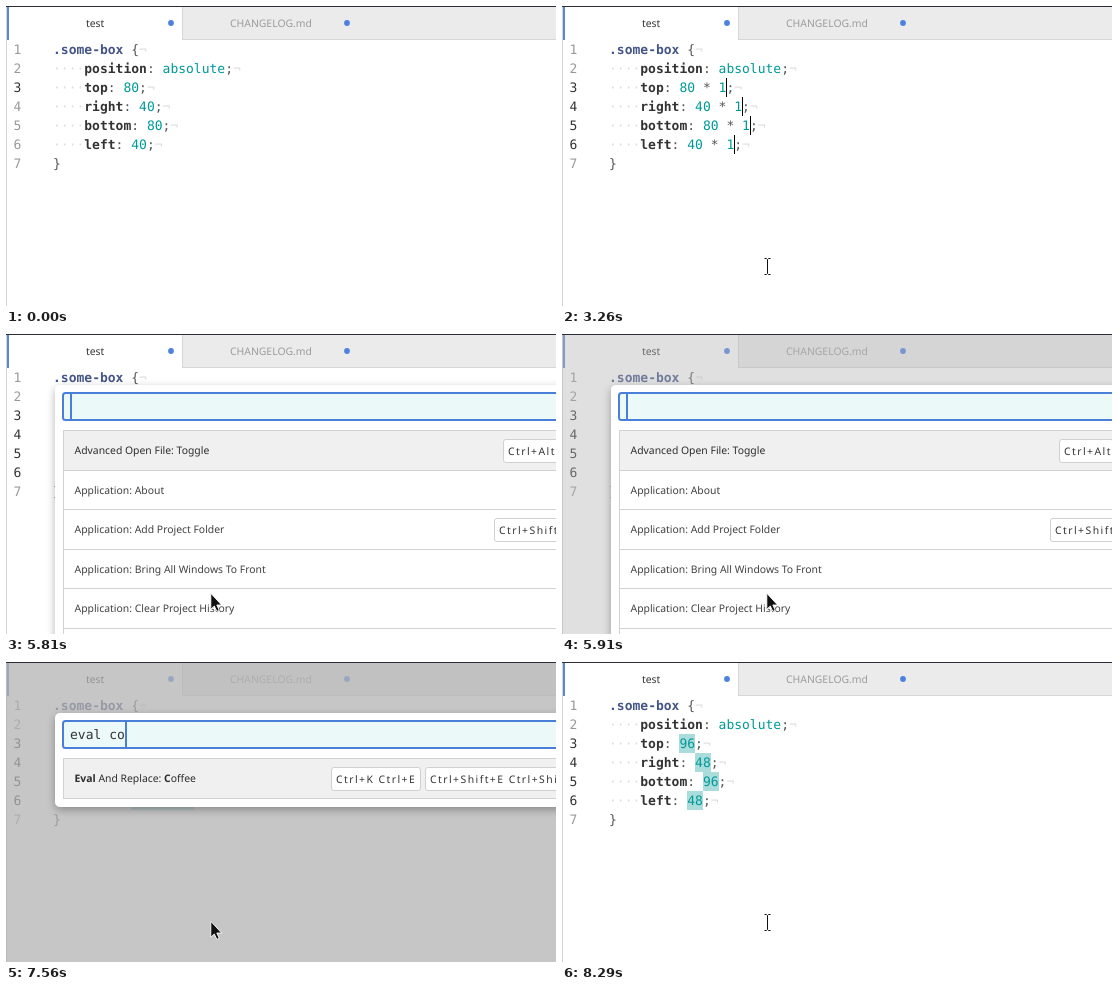
These frames come from a looping animation (550 by 300 pixels, 9750 ms). An HTML page:

```html
<!DOCTYPE html>
<html lang="en">
<head>
<meta charset="utf-8">
<title>Evaluate in editor</title>
<style>
html, body { margin: 0; width: 100%; height: 100%; overflow: hidden; background: #fff; }
svg { display: block; width: 550px; height: 300px; }
text { white-space: pre; text-rendering: geometricPrecision; }
.code { font: 13px "DejaVu Sans Mono", monospace; }
.ui { font: 10.4px "Noto Sans", "Open Sans", sans-serif; }
.key { letter-spacing: 1.45px; }
.b { font-weight: bold; }
</style>
</head>
<body>
<svg id="stage" viewBox="0 0 550 300" xmlns="http://www.w3.org/2000/svg">
  <defs>
    <filter id="shadow" x="-10%" y="-20%" width="120%" height="150%">
      <feDropShadow dx="0" dy="3" stdDeviation="4" flood-color="#000" flood-opacity=".3"/>
    </filter>
  </defs>
  <g id="editor"></g>
  <rect id="shade" y="1" width="550" height="299" fill="#b3b3b3"/>
  <g id="palette"></g>
  <g id="mouse"></g>
</svg>
<script>
const LOOP = 9750, CW = 13 * 1233 / 2048, LEFT = 47, ROW = 19, TOP = 34;
const OPEN = 5810, CLOSE = 8250, RESULT = 8290;
const INK = '#555', TEAL = '#099', FAINT = '#dcdcdc', RULE = '#d2d2d2', BLUE = '#4a7fd9';
const $ = id => document.getElementById(id);

const rect = (x, y, w, h, fill, extra = '') =>
  `<rect x="${x}" y="${y}" width="${w}" height="${h}" fill="${fill}" ${extra}/>`;
const text = (x, y, s, fill, cls) =>
  `<text x="${x}" y="${y}" fill="${fill}" class="${cls}">${s}</text>`;
// Latest value in a list of [time, value] pairs
const at = (steps, t) => steps.reduce((v, s) => t >= s[0] ? s[1] : v, steps[0][1]);

const fields = [['top', 80], ['right', 40], ['bottom', 80], ['left', 40]];
const caretFrom = [270, 1270, 1510, 1850];
const typed = [[0, ''], [2450, ' '], [2890, ' *'], [3030, ' * '],
  [3260, ' * 1'], [3610, ' * 1.'], [3940, ' * 1.2']];
// Characters selected, counted back from the semicolon
const selected = [[0, 0], [4260, 1], [4365, 2], [4470, 3], [4630, 5], [4800, 8], [RESULT, 2]];

const colX = col => LEFT + col * CW;
const mono = (col, row, s, fill, cls = '') =>
  text(colX(col), TOP + 14 + row * ROW, s, fill, 'code ' + cls);

function chrome() {
  return rect(0, 0, 550, 300, '#fff') +
    rect(176, 1, 374, 33, '#ebebeb') +
    rect(176, 33, 374, 1, '#d6d6d6') +
    rect(176, 1, 1, 33, '#d6d6d6') +
    rect(0, 1, 1, 299, '#d4d4d4') +
    rect(1, 1, 2, 33, '#5a86dc') +
    rect(0, 0, 550, 1, '#2c2c3a') +
    text(80, 21, 'test', '#333', 'ui') +
    text(224, 21, 'CHANGELOG.md', '#9c9c9c', 'ui') +
    [165, 341].map(x => `<circle cx="${x}" cy="17" r="2.9" fill="#4f80e1"/>`).join('');
}

function field(i, t) {
  const row = i + 2, [name, num] = fields[i];
  const done = t >= RESULT;
  const tail = done ? '' : at(typed, t);
  const value = done ? String(num * 1.2) : String(num);
  const col = 4 + name.length, start = col + 2;
  const end = start + value.length + tail.length;
  const sel = at(selected, t);
  let out = '';
  if (sel) out += rect(Math.round(colX(end - sel)), TOP + row * ROW,
    Math.round(sel * CW), ROW, '#a9dcdb');
  out += mono(0, row, '····', FAINT) + mono(4, row, name, '#333', 'b') +
    mono(col, row, ':', INK) + mono(start, row, value, TEAL);
  const after = start + value.length;
  if (tail.length > 1) out += mono(after + 1, row, '*', INK);
  if (tail.length > 3) out += mono(after + 3, row, tail.slice(3), TEAL);
  out += mono(end, row, ';', INK) + mono(end + 1, row, '¬', FAINT);
  const blinkOff = t >= 610 && t < 780;
  if (t >= caretFrom[i] && !sel && !blinkOff) {
    const c = t >= 2110 ? end : end + 1;
    out += rect(Math.round(colX(c)), TOP + row * ROW, 1, ROW, '#000');
  }
  return out;
}

function editor(t) {
  let out = chrome();
  for (let r = 0; r < 7; r++) {
    const i = r - 2;
    const active = i === 0 || (i > 0 && i < 4 && t >= caretFrom[i]);
    out += text(7.5, TOP + 14 + r * ROW, r + 1, active ? '#333' : '#999', 'code');
  }
  out += mono(0, 0, '.some-box', '#458', 'b') + mono(10, 0, '{', INK) + mono(11, 0, '¬', FAINT);
  out += mono(0, 1, '····', FAINT) + mono(4, 1, 'position', '#333', 'b') + mono(12, 1, ':', INK) +
    mono(14, 1, 'absolute', TEAL) + mono(22, 1, ';', INK) + mono(23, 1, '¬', FAINT);
  fields.forEach((f, i) => out += field(i, t));
  return out + mono(0, 6, '}', INK);
}

// Rows: label with *matched* parts, then [x, keys] pairs
const chord = 'Ctrl+Shift+E Ctrl+Shift+', combo = 'Ctrl+K Ctrl+E';
const evalRows = e => [
  [`*Eval* And R${e}place: Js`, [411, chord + 'J']],
  [`*Eval* And R${e}place: Shell`, [409, chord + 'S']],
  [`*Eval* And R${e}place: Coffee`, [315, combo], [409, chord + 'C']],
  [`Tree View: R*eveal* Activ${e} File`, [396, 'Ctrl+K Ctrl+T'], [490, 'Ctrl+Shift+T']],
  [`S*e*ttings *V*iew: Uninst*al*l Th${e}mes`]
];
const coffee = s => [[`*Eval* And Replace: ${s}`, [325, combo], [419, chord + 'C']]];
const all = [
  ['Advanced Open File: Toggle', [497, 'Ctrl+Alt+O']],
  ['Application: About'],
  ['Application: Add Project Folder', [488, 'Ctrl+Shift+A']],
  ['Application: Bring All Windows To Front'],
  ['Application: Clear Project History']
];
const key = n => 7260 + n * 580 / 9;
const queries = [[OPEN, ''], [6230, 'e'], [6780, 'eval'], [6980, 'eval e'], [key(0), 'eval '],
  [key(2), 'eval c'], [key(4), 'eval co'], [key(6), 'eval cof'], [key(8), 'eval coff']];
const lists = [[OPEN, all], [6820, evalRows('e')], [7050, evalRows('*e*')],
  [key(1), evalRows('e')], [key(3), coffee('*C*offee')], [key(5), coffee('*Co*ffee')],
  [key(7), coffee('*Cof*fee')], [key(9), coffee('*Coff*ee')]];

const marked = s => s.split('*').map((p, i) => i % 2 ? `<tspan class="b">${p}</tspan>` : p).join('');

function keycap(x, y, s) {
  const w = s.length === combo.length ? 89 : s.length * 7.6 + 9;
  return rect(x + .5, y + .5, w, 23, '#fff', 'rx="2.5" stroke="#d0d0d0"') +
    text(x + 5, y + 16, s, '#333', 'ui key');
}

function palette(t) {
  const rows = at(lists, t), query = at(queries, t), short = rows.length === 1;
  let out = rect(49, 51, 560, short ? 94 : 300, '#fff', 'rx="5" filter="url(#shadow)"');
  out += rect(57, 59, 540, 27, '#ebf9f9', `rx="2.5" stroke="${BLUE}" stroke-width="2"`);
  out += text(64, 77, query, '#333', 'code');
  out += rect(Math.round(64 + query.length * CW), 60, 2, 25, BLUE);
  out += rect(57, 97, 540, 39, '#f0f0f0');
  out += rect(57, 97, 1, short ? 39 : 203, RULE) + rect(57, 96, 540, 1, RULE);
  rows.forEach(([label, ...keys], i) => {
    const y = Math.floor(96.5 + i * 39.5 + .5);
    out += rect(57, Math.floor(136 + i * 39.5), 540, 1, RULE) +
      text(68.5, 120.3 + i * 39.4, marked(label), i ? '#404040' : '#2c2c2c', 'ui');
    keys.forEach(([x, s]) => out += keycap(x, y + 8, s));
  });
  return out;
}

function mouse(t) {
  if (t < 90) return '';
  if (t < 230 || (t >= OPEN && t < CLOSE))
    return '<path d="M204.8 259.3V275.2L208.3 272L210.9 277.4L213.3 276.3L210.8 271H215.6Z" ' +
      'fill="#111" stroke="#fff" stroke-width=".9"/>';
  const d = 'M202.5 252.5H204.5L205.5 253.5L206.5 252.5H208.5M205.5 253.5V267.5' +
    'M202.5 268.5H204.5L205.5 267.5L206.5 268.5H208.5';
  return `<path d="${d}" fill="none" stroke="#fff" stroke-width="2.6"/>` +
    `<path d="${d}" fill="none" stroke="#111"/>`;
}

const last = {};
function put(id, html) {
  if (last[id] !== html) $(id).innerHTML = last[id] = html;
}

function draw(t) {
  const open = t >= OPEN && t < CLOSE;
  const p = Math.min(1, Math.max(0, (t - OPEN) / 270));
  put('editor', editor(t));
  $('shade').setAttribute('opacity', open ? .75 * (1 - (1 - p) ** 1.7) : 0);
  put('palette', open ? palette(t) : '');
  put('mouse', mouse(t));
}

const begin = performance.now();
function tick() {
  draw((performance.now() - begin) % LOOP);
  requestAnimationFrame(tick);
}
tick();
</script>
</body>
</html>
```
